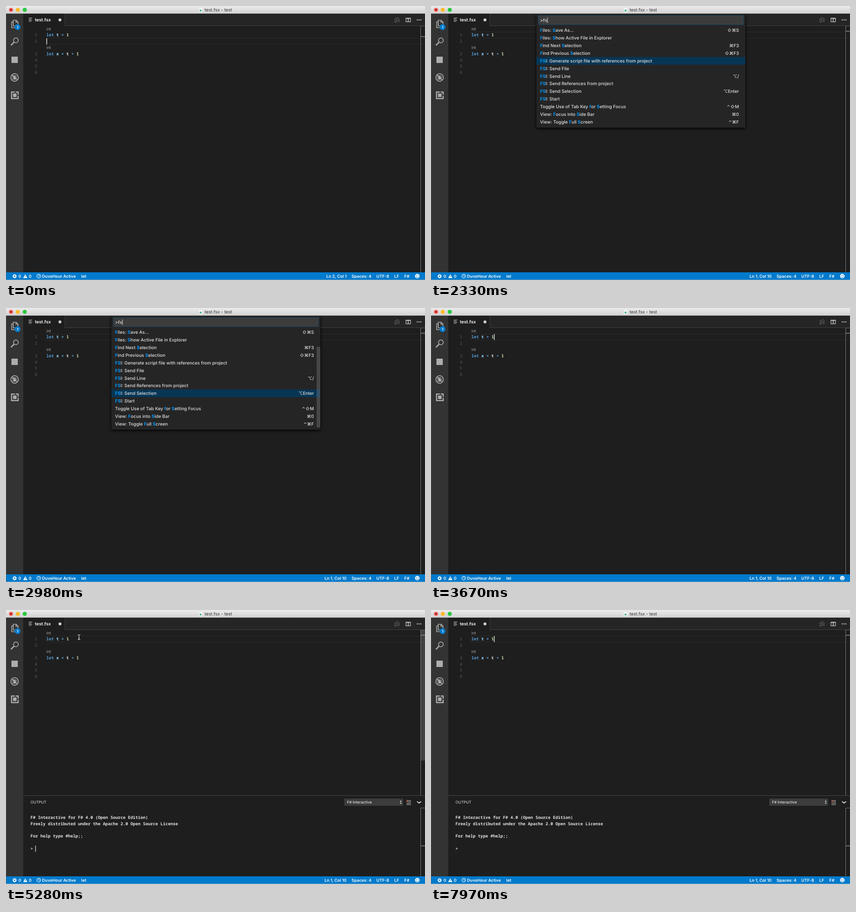
These frames come from a looping animation (924x606 px, 8 s). An HTML page:

```html
<!DOCTYPE html>
<html lang="en">
<head>
<meta charset="utf-8">
<title>test.fsx - test</title>
<style>
  html, body { margin: 0; width: 100%; height: 100%; overflow: hidden; background: #1e1e1e; }
  svg { display: block; }
  text { white-space: pre; text-rendering: geometricPrecision; font: 500 9.7px Inter, "DejaVu Sans", sans-serif; fill: #e2e2e2; }
  .code { font: 600 9.2px "Noto Sans Mono", "DejaVu Sans Mono", monospace; }
  .num { fill: #5a5a5a; font-weight: 400; }
  .lens { font-size: 8.8px; font-weight: 400; fill: #a8a8a8; }
  .item { font-size: 9.9px; }
  .status { font-size: 9.1px; font-weight: 600; fill: #fff; }
  .small { font-size: 8.4px; }
  .key { text-anchor: end; }
  .hit { fill: #0097fb; font-weight: 700; }
  .kw { fill: #569cd6; }
  .var { fill: #9cdcfe; font-weight: 700; }
  .lit { fill: #c6dfb0; }
  .line { fill: none; stroke: #adadad; stroke-width: 1.7; }
</style>
</head>
<body>
<svg id="stage" width="924" height="606" viewBox="0 0 924 606"></svg>
<script>
const LOOP = 8000, ROW = 16.86, LIST_TOP = 45.4, LINE = 13.8;

const rect = (x, y, w, h, fill, more = "") =>
  `<rect x="${x}" y="${y}" width="${w}" height="${h}" fill="${fill}" ${more}/>`;
const disc = (x, y, r, fill, more = "") =>
  `<circle cx="${x}" cy="${y}" r="${r}" fill="${fill}" ${more}/>`;
const path = (d, more = 'class="line"') => `<path d="${d}" ${more}/>`;
const pen = (color, width = 1) => `fill="none" stroke="${color}" stroke-width="${width}"`;
// y is the middle of the letters
const text = (x, y, str, cls = "", more = "") =>
  `<text x="${x}" y="${y + 3.4}" class="${cls}" ${more}>${str}</text>`;
const group = (id, inner) => `<g id="${id}">${inner}</g>`;

const commands = [
  "Add Cursor Above|⌥⌘↑", "Add Cursor Below|⌥⌘↓", "Add Line Comment|⌘K ⌘C",
  "Add Selection To Next Find Match|⌘D", "Add Selection To Previous Find Match|",
  "Bookmarks: Clear|", "Bookmarks: Clear from All Files|", "Bookmarks: Jump to Next|⌥⌘L",
  "Bookmarks: Jump to Previous|⌥⌘J", "Bookmarks: List|", "Bookmarks: List from All Files|",
  "Bookmarks: Toggle|⌥⌘K", "Change All Occurrences|⌘F2"
];
const matches = [
  "[F]iles: [S]ave As...|⇧⌘S", "[F]iles: [S]how Active File in Explorer|",
  "[F]ind Next [S]election|⌘F3", "[F]ind Previous [S]election|⇧⌘F3",
  "[FS]I: Generate script file with references from project|", "[FS]I: Send File|",
  "[FS]I: Send Line|⌥/", "[FS]I: Send References from project|",
  "[FS]I: Send Selection|⌥Enter", "[FS]I: Start|",
  "Toggle Use of Tab Key [f]or [S]etting Focus|⌃⇧M",
  "View: [F]ocus into [S]ide Bar|⌘0", "View: Toggle [F]ull [S]creen|⌃⌘F"
];

function listRows(items) {
  return items.map((item, i) => {
    const [label, key] = item.split("|"), y = 54 + i * ROW;
    const marked = label.replace(/\[(\w+)\]/g, '<tspan class="hit">$1</tspan>');
    return text(240.5, y, marked, "item") + text(679, y, key, "key");
  }).join("");
}

function titleBar() {
  return `<linearGradient id="chrome" x2="0" y2="1"><stop stop-color="#ebebeb"/><stop offset="1" stop-color="#d1d1d1"/></linearGradient>` +
    rect(0, 0, 924, 17, "url(#chrome)") + rect(0, 16, 924, 1, "#b4b4b4") +
    disc(11, 8.5, 4.6, "#fc5b57") + disc(11, 8.5, 1.6, "#5a0a08") +
    disc(26, 8.5, 4.6, "#fdbc2e") + disc(41.3, 8.5, 4.6, "#28c840") +
    rect(425.5, 4.5, 7, 9, "#f6f6f6") + rect(427, 8, 4, 4, "#4fb592") +
    text(438, 8.7, "test.fsx - test", "", 'style="fill:#333;font-weight:400"');
}

function activityBar() {
  const solid = 'fill="#adadad"';
  return rect(0, 17, 38, 572, "#333") +
    path("M16 31.5h6.5l4 4v8.5h-10.5z M22 31.5v4.5h4.5 M16 35h-3.5v13h9.5v-4") +
    disc(25.5, 46.7, 6.5, "#007acc") +
    text(25.5, 46.5, "1", "small", 'text-anchor="middle" style="fill:#fff;font-weight:600"') +
    disc(21.8, 76, 5.3, "none", 'class="line"') +
    path("M17.8 80L11 87", pen("#adadad", 2.6)) +
    rect(12, 112, 14, 14, "#adadad") +
    disc(19, 158, 8.3, "none", 'class="line"') +
    `<ellipse cx="19" cy="159" rx="2.8" ry="4" ${solid}/>` +
    path("M13.5 155l3 2M13 159h3M14 163l3-2M24.5 155l-3 2M25 159h-3M24 163l-3-2M16.5 153l2 2M21.5 153l-2 2", pen("#adadad", 1.2)) +
    path("M13.2 152.2L24.8 163.8", pen("#adadad", 1.6)) +
    path("M19.5 190.2h-7.3v14.6h14.6v-6.3 M21.5 190.2h5.3v6", pen("#adadad", 2.4)) +
    rect(15.5, 193.5, 7.8, 7.8, "#adadad");
}

function tabBar() {
  return rect(38, 17, 886, 26.5, "#252526") + rect(38, 17, 92, 27, "#1e1e1e") +
    path("M130 17v26.5h794", pen("#414141")) +
    path("M50 26.5h8M50 29h6M50 31.5h8M50 34h6", pen("#c5c5c5")) +
    text(63.7, 30.3, "test.fsx", "", 'style="fill:#fff;font-weight:600"') + disc(119, 30.7, 3.2, "#cfcfcf") +
    path("M861 28v-2h4l2 2v7h-2 M857.5 28.5h3.5M857.5 28.5v7h3", pen("#666")) +
    disc(863, 31.5, 2.3, "none", 'stroke="#666"') + path("M861.5 33.5l-3 3", pen("#666", 1.3)) +
    rect(882, 27, 10, 8, "none", 'stroke="#d0d0d0" stroke-width="1.2"') + path("M887 27v8M882 27.5h10", pen("#d0d0d0", 1.5)) +
    [907, 911, 915].map(x => disc(x, 30.7, 1.2, "#d0d0d0")).join("");
}

function editor() {
  const kw = s => `<tspan class="kw">${s}</tspan>`;
  const name = s => `<tspan class="var">${s}</tspan>`;
  const lit = s => `<tspan class="lit">${s}</tspan>`;
  const numbers = [0, 1, 3, 4, 5, 6].map((row, i) =>
    text(63.5, 64 + row * LINE, i + 1, "code num")).join("");
  return rect(89, 57.5, 835, 13.3, "none", 'id="current" stroke="#2c2c2c"') +
    numbers + text(89, 50.2, "int", "lens") + text(89, 91.7, "int", "lens") +
    text(89, 64, `${kw("let")} ${name("t")} ${kw("=")} ${lit(1)}`, "code") +
    text(89, 64 + 3 * LINE, `${kw("let")} ${name("x")} ${kw("=")} t ${kw("+")} ${lit(1)}`, "code") +
    path("M914.5 589V44H924", pen("#7c7c7c")) +
    rect(914, 44, 10, 289, "#797979", 'id="slider"') +
    rect(915, 55, 9, 1.2, "#a0a0a0", 'id="mark"') +
    rect(138.8, 57.5, 1.5, 13.5, "#e4e4dc", 'id="caret"');
}

function panel() {
  const output = (row, str) => text(54, 458.3 + row * LINE, str, "code");
  return rect(38, 410, 886, 179, "#1e1e1e") + rect(38, 410, 886, 1, "#464646") +
    text(54, 424.8, "OUTPUT", "small", 'style="font-weight:400"') +
    rect(746, 417, 130, 16, "#3c3c3c", 'rx="2"') + text(752, 424.8, "F# Interactive", "small") +
    path("M868.5 424l2-3 2 3zM868.5 426l2 3 2-3z", 'fill="#ddd"') +
    path("M887 421.5h6M887 424.5h6M883 427.5h10M883 430.5h10", pen("#d0d0d0", 1.2)) +
    path("M883 420l4 5M887 420l-4 5", pen("#e0796b", 1.2)) +
    path("M906.5 423.5l4.5 3.5 4.5-3.5", pen("#dcdcdc", 2)) +
    path("M914.5 589V438H924", pen("#7c7c7c")) +
    rect(915, 451, 9, 1.2, "#a0a0a0", 'id="panelMark"') +
    group("banner", output(0, "F# Interactive for F# 4.0 (Open Source Edition)") +
      output(1, "Freely distributed under the Apache 2.0 Open Source License") +
      output(3, "For help type #help;;")) +
    group("prompt", output(5, "&gt;")) +
    rect(64.5, 521, 1.3, 13.7, "#e4e4dc", 'id="panelCaret"');
}

function statusBar() {
  const label = (x, str, more) => text(x, 597.4, str, "status", more);
  return rect(0, 589, 924, 17, "#007acc") +
    disc(19, 597.7, 4.2, "#fff") + path("M17.3 596l3.4 3.4M20.7 596l-3.4 3.4", pen("#007acc", 1.2)) +
    label(27.5, "0") + path("M42.5 593.3l4.6 8.4h-9.2z", 'fill="#fff"') +
    path("M42.5 596v3M42.5 599.7v1", pen("#007acc")) + label(50.3, "0") +
    disc(72.3, 597.5, 4.1, "none", 'stroke="#fff" stroke-width="1.2"') + path("M72.3 595v2.8h2.5", pen("#fff")) +
    label(79.5, "DuvoHour Active") + label(166, "let") +
    label(751, "Ln 1, Col 10", 'id="position" text-anchor="end"') +
    label(762, "Spaces: 4") + label(816.7, "UTF-8") + label(856.3, "LF") + label(878.3, "F#") +
    disc(907, 597.5, 5, "#fff") + disc(905.2, 596, 0.9, "#007acc") + disc(908.8, 596, 0.9, "#007acc") +
    path("M904 598.5q3 4 6 0", pen("#007acc", 1.1));
}

function windowEdge() {
  return rect(0, 17, 0.6, 589, "#555") + rect(0, 605.3, 924, 0.7, "#9ab");
}

function palette() {
  return rect(232.4, 17, 460.6, 252, "#252526", 'style="filter:drop-shadow(0 2px 3px #000)"') +
    rect(237, 21.5, 452, 19.5, "#3c3c3c", 'stroke="#1a4d6c"') +
    text(240.5, 31.3, "", "item", 'id="query"') + rect(0, 25.5, 1, 12, "#e8e8e8", 'id="queryCaret"') +
    rect(232.4, LIST_TOP, 460.6, ROW, "#073655", 'id="selected"') +
    group("commands", listRows(commands)) + group("matches", listRows(matches)) +
    rect(685, 45, 8, 16, "#797979", 'id="thumb" opacity=".4"');
}

function pointer() {
  const beam = "M-3-5.5Q0-5.5 0-3.5Q0-5.5 3-5.5M0-4V4M-3 5.5Q0 5.5 0 3.5Q0 5.5 3 5.5M-1.5 1.5h3";
  return group("beam", path(beam, pen("#111", 2.4)) + path(beam, pen("#e8e8e8", 1.1))) +
    group("arrow", path("M-4-6V5l2.6-2.4 1.8 4 1.9-.8-1.8-3.9H4z", 'fill="#111" stroke="#fff" stroke-width=".8"'));
}

document.getElementById("stage").innerHTML =
  rect(0, 0, 924, 606, "#1e1e1e") + editor() + group("panel", panel()) + tabBar() +
  activityBar() + group("palette", palette()) + statusBar() + windowEdge() + titleBar() +
  group("pointer", pointer());

const el = id => document.getElementById(id);
const show = (id, on) => el(id).setAttribute("visibility", on ? "inherit" : "hidden");
const set = (id, key, value) => el(id).setAttribute(key, value);
const within = (t, from, to) => t >= from && t < to;

// Value of the last [time, value] step already reached
const at = (steps, t) => steps.reduce((v, [time, value]) => t >= time ? value : v, steps[0][1]);

const caretSteps = [[0, 1], [870, 0], [1380, 1], [1510, 0], [3670, 1], [4310, 0],
  [5630, 1], [6190, 0], [6690, 1], [7200, 0], [7630, 1]];
const selectedSteps = [[0, 0], [2330, 4], [2670, 5], [2790, 6], [2940, 7], [2980, 8], [3170, 9]];
const querySteps = [[0, [">", 247]], [2280, [">f", 251]], [2330, [">fs", 256.3]]];

// Each move: start, end, number of pictures, points passed
const moves = [
  [4310, 5080, 20, [[28.5, 588], [90, 490], [175, 260], [172, 90]]],
  [5150, 5280, 6, [[170, 82], [161, 60]]],
  [5960, 6400, 11, [[160, 66], [135, 200], [170, 400], [224, 566]]],
  [7110, 7230, 5, [[222, 567], [210.5, 574.5]]]
];

function pointerAt(t) {
  const move = moves.filter(m => t >= m[0]).pop();
  if (!move) return null;
  const [from, to, count, pts] = move;
  const step = Math.min(count - 1, Math.floor((t - from) / (to - from) * (count - 1) + 0.001));
  const pos = step / (count - 1) * (pts.length - 1);
  const i = Math.min(pts.length - 2, Math.floor(pos)), k = pos - i;
  return pts[i].map((v, axis) => v + (pts[i + 1][axis] - v) * k);
}

function render(t) {
  const second = t < 360;
  set("caret", "x", second ? 89 : 138.8);
  set("caret", "y", second ? 71.5 : 57.5);
  show("caret", at(caretSteps, t));
  set("current", "y", second ? 71.5 : 57.5);
  set("mark", "y", second ? 67 : 55);
  el("position").textContent = second ? "Ln 2, Col 1" : "Ln 1, Col 10";

  show("palette", within(t, 1510, 3670));
  const [query, caretX] = at(querySteps, t);
  el("query").textContent = query;
  set("queryCaret", "x", caretX);
  set("selected", "y", LIST_TOP + at(selectedSteps, t) * ROW);
  show("commands", within(t, 1510, 2330));
  show("matches", within(t, 2330, 3670));
  const scrolled = t >= 2670;
  set("thumb", "y", scrolled ? 86 : 45);
  set("thumb", "height", scrolled ? 178 : 16);
  set("thumb", "opacity", within(t, 1880, 2330) || scrolled ? 0.4 : 0);

  show("panel", t >= 3860);
  show("banner", t >= 4760);
  show("prompt", t >= 5150);
  show("panelCaret", within(t, 5150, 5630));
  set("panelMark", "y", t < 4760 ? 451 : 521);

  const spot = t < 7970 ? pointerAt(t) : null;
  show("pointer", spot);
  if (spot) {
    const onBar = spot[0] < 38 || spot[1] > 589;
    set("pointer", "transform", `translate(${spot})`);
    show("arrow", onBar);
    show("beam", !onBar);
  }
  const fadeIn = Math.min(1, Math.max(0, (t - 4720) / 100));
  const fadeOut = Math.min(1, Math.max(0, (t - 6200) / 800));
  set("slider", "opacity", 0.4 * (fadeIn - fadeOut));
}

const start = performance.now();
function frame() {
  render((performance.now() - start) % LOOP);
  requestAnimationFrame(frame);
}
frame();
</script>
</body>
</html>
```
